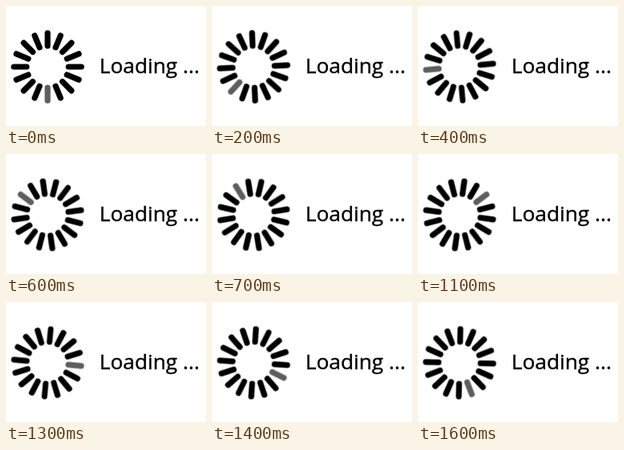
These frames come from a looping animation (250x150 px, 1700 ms). An HTML page:

```html
<!DOCTYPE html>
<html lang="en">
<head>
<meta charset="utf-8">
<title>Loading</title>
<style>
  html, body { margin: 0; width: 100%; height: 100%; overflow: hidden; background: #fff; }
  svg { display: block; width: 250px; height: 150px; }
  line { stroke: #000; stroke-width: 7.2; stroke-linecap: round; }
  line:first-child { stroke: #5e5e5e; }
  text { font: 26.3px "Open Sans", "Noto Sans", sans-serif; fill: #000; stroke: #000; stroke-width: 0.4; }
</style>
</head>
<body>
<svg viewBox="0 0 250 150">
  <g transform="translate(52 76)"><g id="wheel"></g></g>
  <text x="116.8" y="84">Loading ...</text>
</svg>
<script>
  const BARS = 16, STEPS = 17, LOOP = 1700;
  const wheel = document.getElementById('wheel');

  // The first bar points straight down and is the grey one.
  for (let i = 0; i < BARS; i++) {
    const bar = document.createElementNS('http://www.w3.org/2000/svg', 'line');
    bar.setAttribute('y1', 26.2);
    bar.setAttribute('y2', 42.2);
    bar.setAttribute('transform', `rotate(${i * 360 / BARS})`);
    wheel.append(bar);
  }

  // The whole wheel turns in 17 hard steps.
  wheel.style.transformOrigin = '0 0';
  wheel.animate(
    { transform: ['rotate(0deg)', 'rotate(360deg)'] },
    { duration: LOOP, iterations: Infinity, easing: `steps(${STEPS}, end)` }
  );
</script>
</body>
</html>
```
